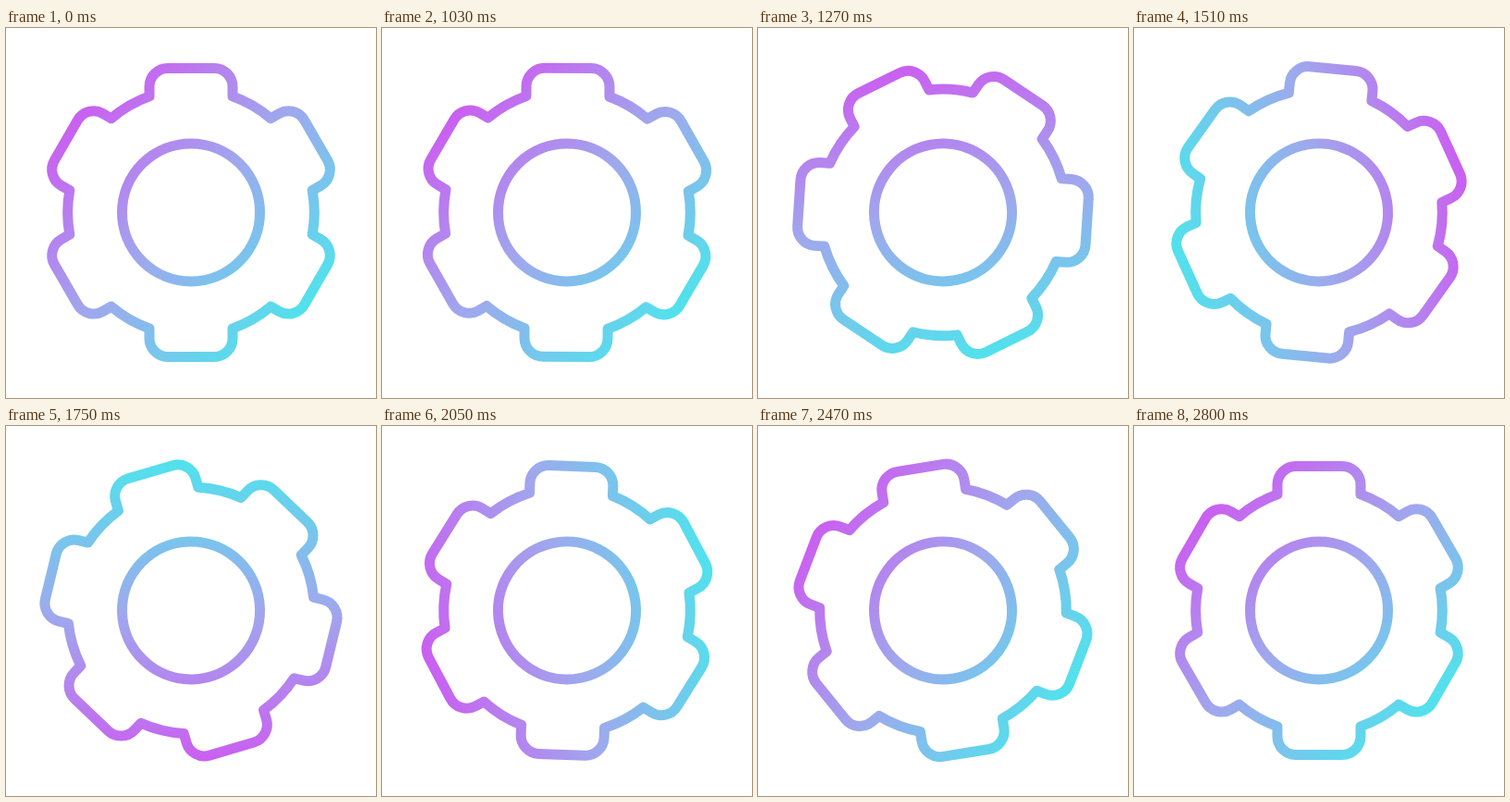
An HTML page with a canvas for the animation above (2.83 s loop, 400 by 400 pixels).

```html
<!DOCTYPE html>
<html lang="en">
<head>
<meta charset="utf-8">
<title>Turning gear</title>
<style>
  html, body { margin: 0; width: 100%; height: 100%; overflow: hidden; background: #fff; }
  canvas { display: block; width: 400px; height: 400px; }
</style>
</head>
<body>
<canvas id="stage" width="400" height="400"></canvas>
<script>
const ctx = document.getElementById('stage').getContext('2d');

const LOOP = 2830, REST = 1000, STEP = 30, STEPS = 60;
const CX = 200, CY = 199.4;
const TEETH = 6, HALF = 45, TIP = 156, ROOT = 125.5, CORNER = 20;
const BODY = Math.hypot(HALF, ROOT), HOLE = 74.5, LINE = 11;
const SPREAD = Math.atan2(HALF, ROOT);
const PITCH = 2 * Math.PI / TEETH;

const bez = (a, b, s) => 3 * (1 - s) * (1 - s) * s * a + 3 * (1 - s) * s * s * b + s * s * s;

// Cubic easing, solved for x by bisection
function ease(x) {
  if (x <= 0 || x >= 1) return x <= 0 ? 0 : 1;
  let lo = 0, hi = 1;
  for (let i = 0; i < 40; i++) {
    const mid = (lo + hi) / 2;
    if (bez(0.32, 0.29, mid) < x) lo = mid; else hi = mid;
  }
  return bez(0.005, 1, lo);
}

function gearPath() {
  ctx.beginPath();
  for (let i = 0; i < TEETH; i++) {
    ctx.lineTo(-HALF, -ROOT);
    ctx.arcTo(-HALF, -TIP, 0, -TIP, CORNER);
    ctx.arcTo(HALF, -TIP, HALF, -ROOT, CORNER);
    ctx.lineTo(HALF, -ROOT);
    ctx.arc(0, 0, BODY, -Math.PI / 2 + SPREAD, -Math.PI / 2 + PITCH - SPREAD);
    ctx.rotate(PITCH);
  }
  ctx.closePath();
}

const tint = ctx.createLinearGradient(-112, -112, 112, 112);
tint.addColorStop(0, '#c961f0');
tint.addColorStop(0.5, '#9ea9ed');
tint.addColorStop(1, '#52e1ec');

function draw(time) {
  const step = Math.max(0, Math.floor((time % LOOP - REST) / STEP + 1e-6));
  ctx.setTransform(1, 0, 0, 1, 0, 0);
  ctx.fillStyle = '#fff';
  ctx.fillRect(0, 0, 400, 400);
  ctx.translate(CX, CY);
  ctx.rotate(2 * Math.PI * ease(step / STEPS));
  ctx.strokeStyle = tint;
  ctx.lineWidth = LINE;
  ctx.lineJoin = 'round';
  gearPath();
  ctx.stroke();
  ctx.beginPath();
  ctx.arc(0, 0, HOLE, 0, 2 * Math.PI);
  ctx.stroke();
}

const start = performance.now();
function tick() {
  draw(performance.now() - start);
  requestAnimationFrame(tick);
}
tick();
</script>
</body>
</html>
```
